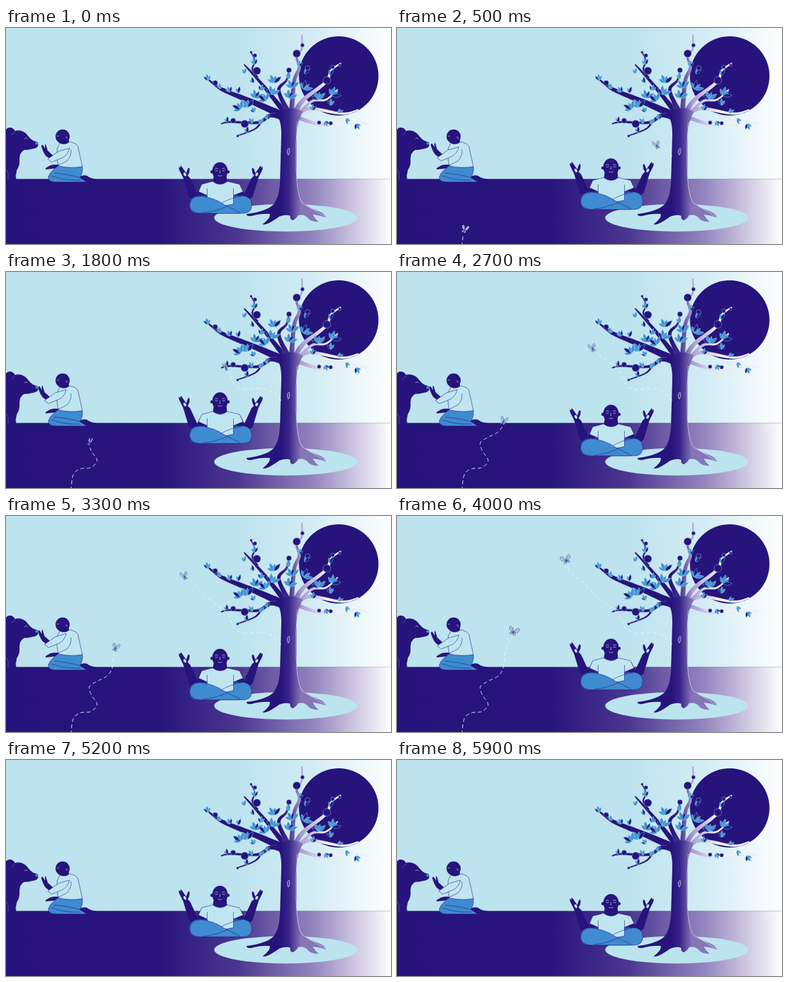
These frames come from a looping animation (600x338 px, 6 s). An HTML page:

```html
<!DOCTYPE html>
<html lang="en">
<head>
<meta charset="utf-8">
<title>Quiet garden</title>
<style>
html, body { margin: 0; width: 100%; height: 100%; overflow: hidden; background: #bce3ee; }
svg { display: block; width: 100vw; height: 100vh; }
.navy { fill: #26147c; }
.pale { fill: #bfe6f0; stroke: #26147c; stroke-width: .6; stroke-linejoin: round; }
.blue { fill: #3f8bd0; stroke: #26147c; stroke-width: .6; stroke-linejoin: round; }
.line { fill: none; stroke: #26147c; stroke-width: .6; }
.face { fill: none; stroke: #bfe6f0; stroke-width: .7; stroke-linecap: round; }
.leaf { fill: #3f93d3; stroke: #c9ebf5; stroke-width: .35; }
.dark { fill: #26147c; stroke: #55b2df; stroke-width: .6; }
.berry { fill: #26147c; stroke: #8fc8e6; stroke-width: .5; }
.trail { fill: none; stroke: #eef9fc; stroke-width: .95; stroke-dasharray: 6 4; }
.reveal { fill: none; stroke: #fff; stroke-width: 6; }
</style>
</head>
<body>
<svg viewBox="0 0 600 338" preserveAspectRatio="none">
  <defs>
    <linearGradient id="sky">
      <stop offset="0" stop-color="#bce3ee"/><stop offset=".6" stop-color="#bce3ee"/>
      <stop offset=".8" stop-color="#d3ecf4"/><stop offset="1" stop-color="#fff"/>
    </linearGradient>
    <linearGradient id="ground">
      <stop offset="0" stop-color="#26147c"/><stop offset=".4" stop-color="#27157c"/>
      <stop offset=".6" stop-color="#4b3690"/><stop offset=".8" stop-color="#9486bf"/>
      <stop offset="1" stop-color="#fff"/>
    </linearGradient>
    <linearGradient id="bark" gradientUnits="userSpaceOnUse" x1="428" y1="0" x2="460" y2="0">
      <stop offset="0" stop-color="#26147c"/><stop offset=".4" stop-color="#36248a"/>
      <stop offset="1" stop-color="#8676b6"/>
    </linearGradient>
    <linearGradient id="twig" gradientUnits="userSpaceOnUse" x1="428" y1="0" x2="500" y2="0">
      <stop offset="0" stop-color="#26147c"/><stop offset=".2" stop-color="#4a388f"/>
      <stop offset=".45" stop-color="#a99cd0"/><stop offset="1" stop-color="#f4f1fa"/>
    </linearGradient>
  </defs>

  <rect width="600" height="338" fill="url(#sky)"/>
  <rect y="236" width="600" height="102" fill="url(#ground)"/>
  <path d="M0 236.3H600" stroke="#8f86bd" stroke-width=".5"/>
  <circle class="navy" cx="518.5" cy="75" r="62"/>
  <ellipse cx="436" cy="297" rx="111.5" ry="21.5" fill="#bce4ee"/>

  <g id="bear">
    <path class="navy" d="M0 159C3 154 11 155 14 161C21 159 28 161 33 167C37 173 42 177 48 178Q51 179 50 184Q49 188 42 189Q34 191 28 191Q21 195 21 205Q22 215 17 222L15 232Q17 236 14 238H0Z"/>
    <path class="face" opacity=".4" d="M14 161Q13 166 9 167M0 221Q5 226 3 237"/>
    <path class="face" d="M29 173q2 -2 4 0"/>
    <circle cx="48" cy="180.500" r="2.300" fill="#3f8bd0"/>
  </g>

  <g id="kneeler">
    <path class="navy" d="M113 234Q119 229 126 231Q132 236 140 236Q143 240 138 241H112Z"/>
    <path class="navy" d="M83 214Q75 213 69 215L62 219Q60 222 65 221L84 219Z"/>
    <path class="blue" d="M82 215L119 217Q120 227 115 234L126 241H76Q65 240 66 233Q68 225 82 215Z"/>
    <path class="line" d="M75 227Q98 229 115 234M70 231Q90 239 116 238"/>
    <path class="navy" d="M80 174H98V182Q90 188 84 181Z"/>
    <circle class="navy" cx="88.200" cy="169.800" r="11"/>
    <path class="face" d="M79.500 169q1.500 1 3 0M93 171q3 -2 2 2"/>
    <path class="pale" d="M84 180Q92 184 99 178Q109 180 112 185L119 217Q100 220 82 216Q78 204 80 188Z"/>
    <path class="line" d="M101 190Q103 199 95 208L77 217"/>
    <g id="reach">
      <path class="navy" d="M70 206L62 200Q58 195 55 185Q56 181 58 184L61 189Q60 181 62 182L65 192L75 201Z"/>
      <path class="pale" d="M99 188Q96 199 88 203L71 210L65 205L82 193Z"/>
    </g>
  </g>

  <g id="sitter">
    <g id="arm">
      <path class="navy" d="M304 247L298 259L287 235L283 231Q287 226 286 220Q285 217 283 221L281 227Q277 222 274 217Q271 214 272 219Q268 215 270 222L276 234L285 264Q291 271 301 267L314 258Z"/>
      <ellipse cx="278.700" cy="229" rx="2" ry="3" fill="#bce3ee" transform="rotate(-25 278.700 229)"/>
    </g>
    <use href="#arm" transform="matrix(-1 0 0 1 669.500 0)"/>
    <path class="blue" d="M300 262.500Q316 261 335 275Q354 261 369 262.500Q383 264 383 277Q383 290 369 290H300Q286 290 286 277Q286 264 300 262.500Z"/>
    <path class="pale" d="M322 240L305 244.500L300 256L313.500 262V275.500Q334 281 354.500 275.500V262L369.500 256L364 244.500L345 240Q334 249 322 240Z"/>
    <path class="line" d="M313.500 262V251M354.500 262V251"/>
    <path class="blue" d="M303 263Q324 265 341 277L363 288Q367 290 361 290H302Q288 289 286 278Q287 264 303 263Z"/>
    <path class="line" d="M368 263Q350 266 336 274M307 289Q324 288 345 279"/>
    <path class="navy" d="M324 230H343.500L344.500 240Q334 248 322.500 240Z"/>
    <ellipse class="navy" cx="333.500" cy="224" rx="12" ry="14"/>
    <circle class="navy" cx="321" cy="225" r="2.500"/><circle class="navy" cx="346" cy="225" r="2.500"/>
    <path class="face" d="M326 223q2 1.600 4 0M337 223q2 1.600 4 0M326 220q2 -1 4 0M337 220q2 -1 4 0M333.500 223v4h-1M330.500 231q3 1.600 6 0"/>
  </g>

  <g id="tree">
    <g id="limbs" fill="url(#twig)" stroke="#d9d2ea" stroke-width=".25"></g>
    <path fill="url(#bark)" d="M418 131Q430 141 429 170L427 240Q426 266 416 277Q405 287 375 291Q374 295 383 294Q398 290 411 291Q413 297 400 307Q405 310 426 295Q437 291 443 294Q442 300 447 301Q454 297 455 293Q465 291 470 297Q476 304 487 303Q481 298 478 292Q490 293 499 297Q498 291 486 286Q466 279 459 270Q454 258 453 232L453 166Q454 145 463 131Q447 124 440 126Z"/>
    <path d="M454 147Q451 180 452 215Q453 262 462 274Q475 282 499 296" fill="none" stroke="#d9d2ea" stroke-width=".8"/>
    <path d="M440 199Q437 195 439 190Q442 186 442 191Q442 197 440 199Z" fill="#4b389a" stroke="#d9d2ea" stroke-width=".8"/>
    <g id="crown"></g>
  </g>
  <g id="flights"></g>
</svg>
<script>
const LOOP = 6000;
const $ = id => document.getElementById(id);
const clamp = v => Math.max(0, Math.min(1, v));
const parse = s => s.split(" ").map(p => p.split(",").map(Number));

// Linear lookup in a list of [time, value] steps
function track(steps, t) {
  let i = 1;
  while (i < steps.length - 1 && t > steps[i][0]) i++;
  const [t0, a] = steps[i - 1], [t1, b] = steps[i];
  return a + (b - a) * clamp((t - t0) / (t1 - t0));
}

// Smooth curve through a few points
function spline(pts) {
  const at = i => pts[Math.max(0, Math.min(pts.length - 1, i))];
  const out = [];
  for (let i = 0; i < pts.length - 1; i++) {
    for (let u = 0; u < 1; u += .125) {
      out.push([0, 1].map(k => {
        const a = at(i - 1)[k], b = at(i)[k], c = at(i + 1)[k], d = at(i + 2)[k];
        return .5 * (2 * b + (c - a) * u + (2 * a - 5 * b + 4 * c - d) * u * u + (3 * b - a - 3 * c + d) * u ** 3);
      }));
    }
  }
  return out.concat([at(pts.length)]);
}
const toPath = pts => "M" + pts.map(p => p.map(v => v.toFixed(1)).join(" ")).join("L");

// Branch that narrows towards its tip
function limb(width, points) {
  const line = spline(parse(points)), left = [], right = [];
  line.forEach(([x, y], i) => {
    const p = line[Math.max(0, i - 1)], q = line[Math.min(line.length - 1, i + 1)];
    const len = Math.hypot(q[0] - p[0], q[1] - p[1]) || 1;
    const w = (width + (1.7 - width) * (i / line.length) ** .6) / 2;
    const dx = (p[1] - q[1]) / len * w, dy = (q[0] - p[0]) / len * w;
    left.push([x + dx, y + dy]);
    right.unshift([x - dx, y - dy]);
  });
  $("limbs").innerHTML += `<path d="${toPath(left.concat(right))}Z"/>`;
}

limb(15, "438,140 392,119 343,99 327,90 311,77");
limb(10, "430,140 412,137 392,148 350,147 335,150");
limb(4, "399,145 388,158 360,169");
limb(11, "436,134 399,88 371,57");
limb(4, "392,78 384,64 388,52 382,38");
limb(10, "440,132 425,98 437,82 441,66");
limb(9, "445,132 449,84 457,62 453,45 461,32 461,10");
limb(10, "450,133 464,112 498,85 507,66 522,55");
limb(9, "452,136 474,126 524,134 549,128");
limb(6, "461,129 478,114 499,112 517,96");
limb(8, "452,139 491,151 538,147 563,150");

const berries = parse("388,43,3 391,67,6 382,38,2 441,66,4 453,40,6 462,27,3 470,63,4 500,82,6 509,61,3 520,58,2 326,86,4 354,145,4 372,150,6 361,169,2 488,148,3 506,149,3");
const bigSprays = parse("377,124 389,110 405,114 414,104 418,86 446,94 464,96 487,112 508,106 441,110 366,127");
const smallSprays = parse("315,82 335,95 350,100 362,102 388,131 371,72 388,57 386,86 397,98 441,80 457,60 466,72 506,121 517,133 478,129 505,74 497,146 530,141 545,150 345,148 384,149 396,151 409,143 376,164");

const leaf = (size, turn, kind) =>
  `<path class="${kind}" transform="rotate(${turn})" d="M0 0Q${size * .45} ${-size * .38} ${size} 0Q${size * .45} ${size * .38} 0 0Z"/>`;

const sprays = [...bigSprays, ...smallSprays].map(([x, y], i) => {
  const big = i < bigSprays.length;
  // Upper leaves point up and outwards, the lower right ones hang
  const turn = x > 485 && y > 138 ? 60 : -90 + (x - 435) * .3 + 25 * Math.sin(i * 2.4);
  return { x, y, turn, count: big ? 4 : 2 + i % 2, size: big ? 14.5 : 9.5 + i % 3 * .6 };
});

$("crown").innerHTML =
  berries.map(([x, y, r]) => `<circle class="berry" cx="${x}" cy="${y}" r="${r}"/>`).join("") +
  sprays.map(({ count, size }, i) => {
    let leaves = "";
    for (let k = 0; k < count; k++) {
      leaves += leaf(size * (k % 2 ? 1 : .82), (k - (count - 1) / 2) * 36, (i + k) % 4 === 3 ? "dark" : "leaf");
    }
    return `<g class="spray">${leaves}</g>`;
  }).join("");
document.querySelectorAll(".spray").forEach((node, i) => sprays[i].node = node);

const flights = [
  { points: "101,342 105,317 116,308 132,306 142,295 133,280 130,267 143,258 158,250 166,236 169,212 182,181",
    steps: [[0, 0], [1000, 54], [1800, 104], [2700, 155], [4000, 215]], side: 1 },
  { points: "429,201 414,187 393,182 374,184 358,178 350,163 344,151 320,133 303,118 290,103 270,88 263,69",
    steps: [[0, 0], [1000, 61], [1800, 112], [2700, 160], [4000, 240]], side: -1 }
];
$("flights").innerHTML = flights.map((f, i) => {
  const d = toPath(spline(parse(f.points)));
  return `<mask id="m${i}" maskUnits="userSpaceOnUse" x="0" y="0" width="600" height="338"><path class="reveal" d="${d}"/></mask>
  <g class="flight">
    <path class="trail" d="${d}" mask="url(#m${i})"/>
    <g class="fly">
      <g class="wing"><path class="pale" d="M0 1C-3 -7 -9 -9 -10 -5C-10 -1 -5 1 0 1C-6 1 -7 6 -4 6Q-1 5 0 1Z"/><path class="line" d="M0 1L-8 -5M0 1L-4 4"/></g>
      <g class="wing"><path class="pale" d="M0 1C1 -7 6 -11 8 -7C9 -2 5 1 0 1C5 1 6 5 3 6Q1 5 0 1Z"/><path class="line" d="M0 1L6 -6"/></g>
      <path class="navy" stroke="#bfe6f0" stroke-width=".3" d="M-1 -2Q1 -1 1 6Q-1 6 -1 -2Z"/>
    </g>
  </g>`;
}).join("");
document.querySelectorAll(".flight").forEach((node, i) => {
  const path = node.querySelector(".trail");
  Object.assign(flights[i], {
    node, path,
    length: path.getTotalLength(),
    fly: node.querySelector(".fly"),
    wings: node.querySelectorAll(".wing"),
    reveal: document.querySelector(`#m${i} path`)
  });
});

const reach = [[0, 0], [150, 0], [850, 1], [3500, 1], [4000, .45], [4600, 0]];

function draw(t) {
  const lift = 12 * (1 - Math.cos(t / 3000 * 2 * Math.PI));
  $("sitter").setAttribute("transform", `translate(0 ${-lift})`);

  const r = track(reach, t);
  $("reach").setAttribute("transform", `translate(${-5 * r} ${-4 * r})`);

  sprays.forEach(({ node, x, y, turn }, i) => {
    const sway = 5 * Math.sin(t / 2000 * 2 * Math.PI + i * 1.7);
    node.setAttribute("transform", `translate(${x} ${y}) rotate(${turn + sway})`);
  });

  const shown = Math.min(clamp(t / 250), clamp((4800 - t) / 700));
  const flap = .68 + .32 * Math.cos(t / 400 * 2 * Math.PI);
  for (const f of flights) {
    const dist = Math.min(f.length, track(f.steps, t));
    const p = f.path.getPointAtLength(dist);
    f.node.setAttribute("opacity", shown);
    f.reveal.setAttribute("stroke-dasharray", `${Math.max(0, dist - 9)} 999`);
    f.fly.setAttribute("transform", `translate(${p.x} ${p.y}) rotate(${f.side * 22}) scale(${f.side * .88} .88)`);
    f.wings.forEach(w => w.setAttribute("transform", `scale(${flap} 1)`));
  }
}

const start = performance.now();
function tick() {
  draw((performance.now() - start) % LOOP);
  requestAnimationFrame(tick);
}
draw(0);
requestAnimationFrame(tick);
</script>
</body>
</html>
```
